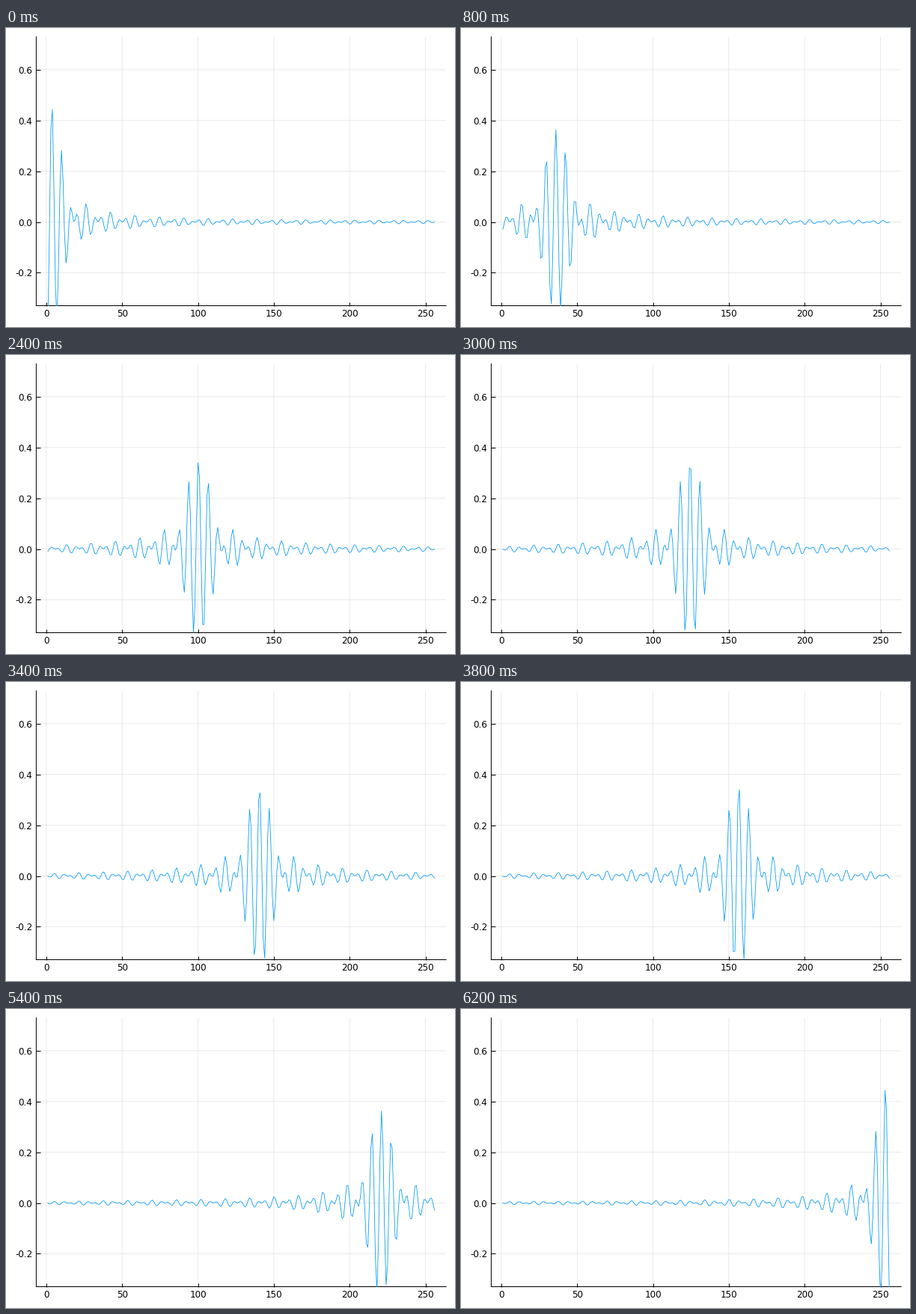
A matplotlib script for the animation above (6400 ms loop, 600x400 px).

```python
import numpy as np
import matplotlib.pyplot as plt
from matplotlib.animation import FuncAnimation
from matplotlib.lines import Line2D

WIDTH, HEIGHT, DPI = 600, 400, 100
LEFT, RIGHT, TOP, BOTTOM = 40.4, 588.2, 11.8, 371.5
N, COUNT, LOW = 256, 32, 64
PX = 72 / DPI  # one pixel in points

plt.rcParams["font.family"] = "DejaVu Sans"


def cosine_band():
    """Orthonormal cosine modes of a path of N nodes, one frequency band."""
    nodes = np.arange(N)[:, None] + 0.5
    modes = np.arange(LOW, LOW + COUNT)
    return np.sqrt(2 / N) * np.cos(np.pi * nodes * modes / N)


def varimax(basis, rotation, steps=600):
    """Rotate the basis until its columns are as localized as possible."""
    for _ in range(steps):
        waves = basis @ rotation
        u, _, vt = np.linalg.svd(basis.T @ (N * waves**3 - waves))
        rotation = u @ vt
    return basis @ rotation


def localized_waves():
    basis = cosine_band()
    # Start from eigenvectors of the position operator, ordered left to right.
    position = basis.T @ (np.arange(N)[:, None] * basis)
    waves = varimax(basis, np.linalg.eigh(position)[1])
    spacing = N // COUNT
    for k in range(COUNT):
        middle = spacing * k + spacing // 2
        waves[:, k] *= np.sign(waves[middle - 1:middle + 1, k].sum())
    return waves


waves = localized_waves()

fig = plt.figure(figsize=(WIDTH / DPI, HEIGHT / DPI), dpi=DPI, facecolor="white")
ax = fig.add_axes([LEFT / WIDTH, 1 - BOTTOM / HEIGHT,
                   (RIGHT - LEFT) / WIDTH, (BOTTOM - TOP) / HEIGHT])
pad = 0.03 * (N - 1)
ax.set_xlim(1 - pad, N + pad)
ax.set_ylim(-0.33, 0.73)

xticks = np.arange(0, 251, 50)
yticks = np.arange(-1, 4) * 0.2
ax.set_xticks(xticks, [str(x) for x in xticks])
ax.set_yticks(yticks, [f"{y:.1f}" for y in yticks])
ax.tick_params(direction="in", width=PX, labelsize=12 * PX)
ax.tick_params(axis="x", length=5 * PX, pad=4.5 * PX)
ax.tick_params(axis="y", length=6 * PX, pad=5 * PX)
ax.grid(color="black", alpha=0.1, linewidth=0.8 * PX)
ax.set_axisbelow(True)
ax.spines[["top", "right"]].set_visible(False)
ax.spines[["left", "bottom"]].set_linewidth(PX)

line, = ax.plot([], [], color="#009afa", linewidth=0.8 * PX, zorder=3)

# Keep strokes at their exact subpixel positions.
for stroke in [*ax.findobj(Line2D), *ax.spines.values()]:
    stroke.set_snap(False)


def draw(frame):
    line.set_data(np.arange(1, N + 1), waves[:, frame])
    return line,


animation = FuncAnimation(fig, draw, frames=COUNT, interval=200, repeat=True)
plt.show()
```
